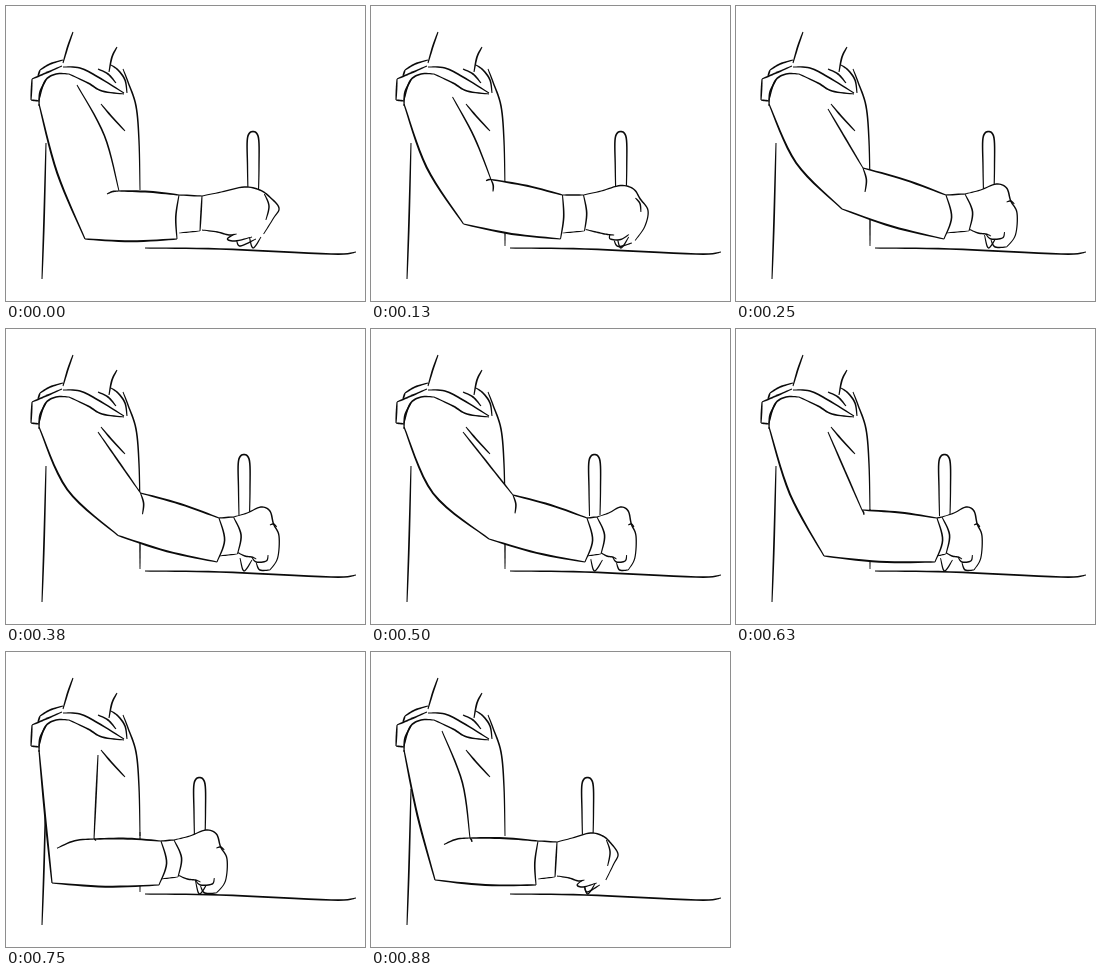
Write an HTML page with a canvas that moves like this. It is 359 px wide and 295 px high and loops after 1010 ms.

```html
<!DOCTYPE html>
<html lang="en">
<head>
<meta charset="utf-8">
<title>Drawing arm</title>
<style>
html, body { margin: 0; width: 359px; height: 295px; overflow: hidden; background: #fff; }
canvas { display: block; }
</style>
</head>
<body>
<canvas id="stage" width="359" height="295"></canvas>
<script>
const ctx = document.getElementById('stage').getContext('2d');
const INK = '#0b0b0b', PAPER = '#fff';
const LOOP = 1010;
const STEPS = [130, 250, 380, 500, 630, 750, 880];

const points = text => text.split(' ').map(pair => pair.split(',').map(Number));
// Blends numbers or nested lists of numbers.
const mix = (a, b, t) => Array.isArray(a) ? a.map((v, i) => mix(v, b[i], t)) : a + (b - a) * t;
const reversed = pts => [...pts].reverse();

// Curve from a to b whose middle is pushed sideways by a share of its length.
const bend = (a, b, push) => [a,
  [(a[0] + b[0]) / 2 - (b[1] - a[1]) * push, (a[1] + b[1]) / 2 + (b[0] - a[0]) * push], b];

// Joint positions: elbow, inner elbow, then x of sleeve end, wrist, knuckles and pen.
// Grip runs from a relaxed hand (0) to a fist (1).
const pose = (elbow, inner, sleeve, wrist, knuckle, pen, grip) =>
  [elbow, inner, sleeve, wrist, knuckle, pen, grip];
const right = pose([79, 233], [113, 185], 173, 196, 273, 247, 0);
const farRight = pose([106, 203], [127, 162], 210, 229, 281, 252.5, 1);
const reach = pose([118, 210], [142, 166], 216, 226, 265, 223.5, 1);
const left = pose([88, 227], [126, 181], 201, 206, 246, 208.5, 1);
const farLeft = pose([46, 231], [88, 187], 155, 168, 221, 193.5, 1);
const back = pose([64, 228], [99, 186], 167, 186, 247, 216.5, 0);
const POSES = [right, mix(right, farRight, 0.5), farRight, mix(farRight, reach, 0.5),
  reach, left, farLeft, back];

// Hand lines: x is the share of the way from wrist to knuckles, y is on the stage.
const RELAXED = ['0,190 .25,186 .55,181 .75,184 .88,191 1,202 .93,212 .8,228',
  '0,224 .2,226 .35,229 .45,228', '.42,228 .33,233 .43,235 .65,231',
  '.45,235 .5,240 .7,233', '.81,188 .87,200 .83,214'].map(points);
const FIST = ['0,188 .3,184 .6,178 .8,182 .88,195 1,207 .97,229 .8,241',
  '.07,223 .25,227 .4,228 .5,230', '.4,228 .5,233 .72,232 .76,226',
  '.5,234 .58,241 .8,241', '.8,196 .88,195 .95,198'].map(points);

const CLOTHES = ['67,26 62,40 57,57', '111,41 106,51 103,66', '57,54 44,58 34,64',
  '34,64 32,70', '56,60 40,67 26,73', '26,73 25,94', '25,94 33,95',
  '33,94 39,75 50,68 63,68', '57,61 74,62 92,71 118,87', '63,68 82,77 96,85 118,88',
  '92,63 102,68 110,77', '105,59 112,64 119,74 121,87', '95,98 106,111 119,125',
  '40,74 34,86 33,100'].map(points);
const SPINE = points('40,137 38,215 36,273');
const TABLE = points('139,242 214,243 325,248 350,246');

// Samples a Catmull-Rom curve through pts.
function smooth(pts) {
  const last = pts.length - 1;
  return Array.from({ length: last * 8 + 1 }, (_, n) => {
    const i = Math.min(n >> 3, last - 1), t = n / 8 - i;
    const [a, b, c, d] = [-1, 0, 1, 2].map(k => pts[Math.max(0, Math.min(last, i + k))]);
    return [0, 1].map(k => b[k] + t / 2 * (c[k] - a[k]
      + t * (2 * a[k] - 5 * b[k] + 4 * c[k] - d[k] + t * (3 * (b[k] - c[k]) + d[k] - a[k]))));
  });
}

function fill(outline, colour) {
  ctx.fillStyle = colour;
  ctx.beginPath();
  outline.forEach(p => ctx.lineTo(...p));
  ctx.fill();
}

const mask = (...curves) => fill(curves.flatMap(smooth), PAPER);

// Ink stroke, thinner at both ends.
function ink(pts, width = 1.6) {
  const curve = smooth(pts), end = curve.length - 1;
  const side = sign => curve.map(([x, y], i) => {
    const a = curve[Math.max(0, i - 1)], b = curve[Math.min(end, i + 1)];
    const angle = Math.atan2(b[1] - a[1], b[0] - a[0]);
    const half = sign * width / 2 * (0.6 + 0.4 * Math.sin(Math.PI * i / end));
    return [x - Math.sin(angle) * half, y + Math.cos(angle) * half];
  });
  fill([...side(1), ...reversed(side(-1))], INK);
}

function drawPen(x) {
  ink([[x - 5, 187], [x - 5.5, 160], [x - 5.5, 132], [x, 125.5],
    [x + 5.5, 132], [x + 6, 160], [x + 5.5, 186]], 1.7);
  ink([[x - 4, 229], [x, 242], [x + 8, 231]], 1.4);
}

function drawHand(wrist, knuckle, grip) {
  const lines = mix(RELAXED, FIST, grip)
    .map(line => line.map(([u, y]) => [mix(wrist, knuckle, u), y]));
  const [top, palm, finger] = lines;
  mask(top, reversed(finger), reversed(palm));
  lines.forEach(line => ink(line, 1.5));
}

function drawSleeve(elbow, inner, sleeve, wrist, grip) {
  const shoulder = [33, 98];
  const armpit = mix([71, 79], [92, 103], grip);
  const tuck = Math.max(0, 125 - inner[0]);
  const crease = 0.8 * Math.max(0, 233 - elbow[1]);
  const hemTop = [sleeve, 189], hemBottom = [sleeve - 2, 233];
  const cuffTop = [wrist, 190 - 2 * grip], cuffBottom = [wrist - 2 + 6 * grip, 225];

  const outer = bend(shoulder, elbow, (elbow[0] - 33) ** 2 / 60000);
  const under = bend(elbow, hemBottom, 0.025);
  const top = bend(inner, hemTop, -0.02);
  const front = bend(armpit, inner, 0.06 * (grip - 1));
  const hem = bend(hemTop, hemBottom, 0.05 - 0.2 * grip);
  const cuff = bend(cuffTop, cuffBottom, -0.15 * grip);

  mask(hem, reversed(cuff));
  mask(outer, under, reversed(hem), reversed(top), reversed(front));
  [outer, under, top].forEach(line => ink(line, 2));
  [front, hem, cuff].forEach(line => ink(line));
  ink([hemTop, cuffTop], 1.5);
  ink([[sleeve, 227], cuffBottom], 1.2);
  if (tuck) ink(bend([inner[0] - tuck, inner[1] + tuck / 4], inner, -0.08));
  if (crease) ink(bend(inner, [inner[0] + 2, inner[1] + crease], -0.1));
}

function draw([elbow, inner, sleeve, wrist, knuckle, pen, grip]) {
  ctx.fillStyle = PAPER;
  ctx.fillRect(0, 0, 359, 295);
  ink(SPINE, 1.7);
  ink(points('117,63 122,76 130,100 133,135 134,184'));
  if (grip) ink([[134, 180], [134, 240]], 1.4);
  ink(TABLE, 1.8);
  drawPen(pen);
  drawHand(wrist, knuckle, grip);
  drawSleeve(elbow, inner, sleeve, wrist, grip);
  CLOTHES.forEach(line => ink(line, 1.7));
}

function tick() {
  const time = performance.now() % LOOP;
  draw(POSES[STEPS.filter(start => time >= start).length]);
  requestAnimationFrame(tick);
}
tick();
</script>
</body>
</html>
```
